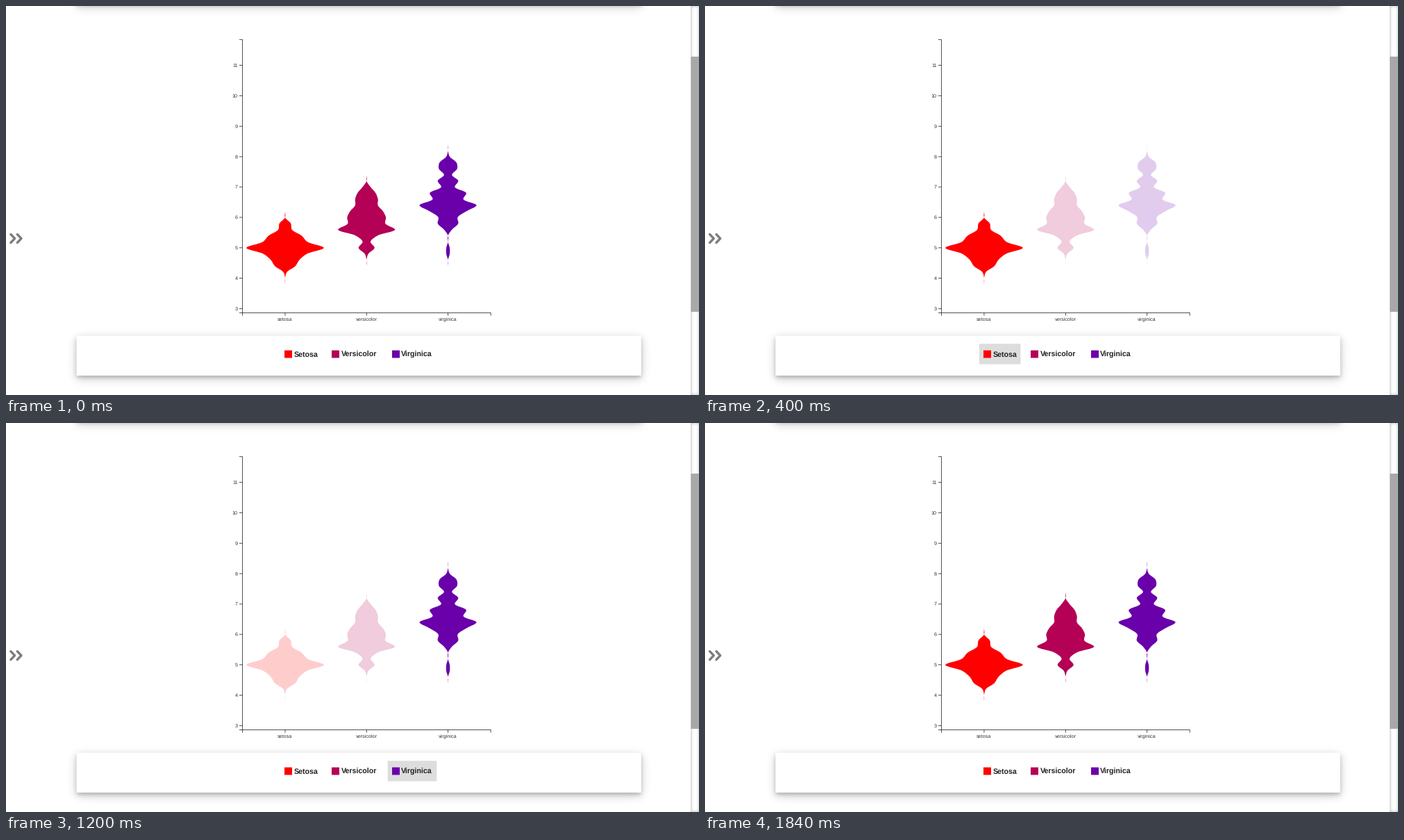
Recreate the animation shown at these times as a matplotlib script. Size 998 px wide and 561 px high, loop 2 s.

```python
import math

import matplotlib.pyplot as plt
import numpy as np
from matplotlib.animation import FuncAnimation
from matplotlib.patches import PathPatch, Rectangle
from matplotlib.path import Path

W, H, DPI = 998, 561, 100
ZOOM = 0.727                      # page zoom applied to all CSS lengths
LEFT, RIGHT = 340.36, 698.1
TOP, BOTTOM = 48.3, 442.36
LOW, HIGH = 4.3 / 1.5, 7.9 * 1.5  # range of the value axis
INK = "#333333"

plt.rcParams["path.snap"] = False
plt.rcParams["text.hinting"] = "none"

# Iris sepal lengths: first value, then how often each 0.1 step occurs
GROUPS = [
    ("setosa", "#ff0000", 4.3, "1314254883152021"),
    ("versicolor", "#b40055", 4.9, "1211015553244232123111"),
    ("virginica", "#6900aa", 4.9, "1000000113122265405230131101401"),
]
# Legend: swatch x, text x, highlight x range
LEGEND = [(401, 414.6, 395, 454.4), (469, 482.8, 463, 541.4),
          (556, 569.4, 549.7, 620.2)]
ACTIVE = [None, 0, 1, 2, None]


def pt(px):
    return px * 72 / DPI


def y_of(value):
    return BOTTOM - (value - LOW) / (HIGH - LOW) * (BOTTOM - TOP)


erf = np.vectorize(math.erf)


def soft_span(n, a, b, sigma):
    """Blurred coverage of the interval a..b over n pixels."""
    p = np.arange(n) + 0.5
    s = sigma * math.sqrt(2)
    return (erf((p - a) / s) - erf((p - b) / s)) / 2


def soft_box(x0, y0, x1, y1, sigma):
    return np.outer(soft_span(H, y0, y1, sigma), soft_span(W, x0, x1, sigma))


def density(start, counts, ticks, width=0.2):
    """Epanechnikov kernel estimate, unnormalised."""
    n = np.array([int(c) for c in counts])
    x = start + 0.1 * np.arange(len(n))
    u = (ticks[:, None] - x) / width
    return (np.clip(1 - u * u, 0, None) * n).sum(axis=1)


def catmull(points):
    """Control points of a centripetal Catmull-Rom spline as cubic Beziers."""
    p = np.vstack([points[:1], points, points[-1:]])
    out = []
    for p0, p1, p2, p3 in zip(p, p[1:], p[2:], p[3:]):
        d01, d12, d23 = (np.hypot(*(b - a))
                         for a, b in ((p0, p1), (p1, p2), (p2, p3)))
        s01, s12, s23 = map(math.sqrt, (d01, d12, d23))
        c1, c2 = p1, p2
        if s01:
            k = 2 * d01 + 3 * s01 * s12 + d12
            c1 = (p1 * k - p0 * d12 + p2 * d01) / (3 * s01 * (s01 + s12))
        if s23:
            k = 2 * d23 + 3 * s23 * s12 + d12
            c2 = (p2 * k + p1 * d23 - p3 * d12) / (3 * s23 * (s23 + s12))
        out += [c1, c2, p2]
    return out


def violin(center, half, ticks):
    ys = y_of(ticks)
    left = np.column_stack([center - half, ys])
    right = np.column_stack([center + half, ys])[::-1]
    a, b = catmull(left), catmull(right)
    verts = [left[0], *a, right[0], *b, left[0]]
    codes = ([Path.MOVETO] + [Path.CURVE4] * len(a) + [Path.LINETO]
             + [Path.CURVE4] * len(b) + [Path.CLOSEPOLY])
    return Path(verts, codes)


def line(xs, ys, width=ZOOM, color="#111111", **kw):
    ax.plot(xs, ys, color=color, lw=pt(width), **kw)


def rect(x0, y0, x1, y1, color, z):
    box = Rectangle((x0, y0), x1 - x0, y1 - y0, fc=color, lw=0, zorder=z)
    ax.add_patch(box)
    return box


def label(x, y, s, size, ha, color=INK, weight="normal"):
    ax.text(x, y, s, fontsize=pt(size), ha=ha, va="baseline", color=color,
            family="Liberation Sans", weight=weight, zorder=6)


fig = plt.figure(figsize=(W / DPI, H / DPI), dpi=DPI, facecolor="white")
ax = fig.add_axes([0, 0, 1, 1])
ax.axis("off")

# Card shadows and the inset shade of the scrollbar track
page = np.ones((H, W))
for y0, y1 in ((-80, -3), (475.5, 533)):
    for dy, blur, alpha in ((4, 8, 0.2), (6, 20, 0.19)):
        dy, sigma = dy * ZOOM, blur * ZOOM / 2
        page *= 1 - alpha * soft_box(101.5, y0 + dy, 914.8, y1 + dy, sigma)
inset = 1 - 0.3 * (1 - soft_box(986.5, 0, W, H, 2.2))
page[:, 986:] = inset[:, 986:]
ax.imshow(page, cmap="gray", vmin=0, vmax=1, extent=(0, W, H, 0),
          interpolation="nearest", aspect="auto", zorder=0)
ax.set_xlim(0, W)
ax.set_ylim(H, 0)

rect(101.5, 475.5, 914.8, 533, "white", 1)
rect(986.3, 73, W, 441, "#a8a8a8", 1)

# Double chevron of the side menu
for dx in (0, 9.4):
    line(np.array([6.9, 12.6, 6.9]) + dx, [329.3, 335.3, 341.3], 3.4, "#7d7d7d",
         solid_capstyle="round", solid_joinstyle="round")

# Axes
tick = 6 * ZOOM
font = 10 * ZOOM
line([LEFT - tick, LEFT, LEFT, LEFT - tick], [TOP, TOP, BOTTOM, BOTTOM],
     solid_joinstyle="miter", solid_capstyle="butt", zorder=5)
line([LEFT, LEFT, RIGHT, RIGHT],
     [BOTTOM + tick, BOTTOM, BOTTOM, BOTTOM + tick],
     solid_joinstyle="miter", solid_capstyle="butt", zorder=5)
for v in range(3, 12):
    y = y_of(v)
    line([LEFT - tick, LEFT], [y, y], solid_capstyle="butt", zorder=5)
    label(LEFT - 9 * ZOOM - 0.3, y + 0.32 * font, str(v), font, "right")

# Violins and legend
step = (RIGHT - LEFT) / 3.05
ticks = np.arange(15, 60) / 5
curves = [density(start, counts, ticks) for _, _, start, counts in GROUPS]
scale = 0.475 * step / max(c.max() for c in curves)
shapes, marks = [], []
for i, (name, color, _, _) in enumerate(GROUPS):
    cx = LEFT + step * (i + 0.525)
    shape = PathPatch(violin(cx, curves[i] * scale, ticks), fc=color, lw=0,
                      zorder=3)
    shapes.append(ax.add_patch(shape))
    line([cx, cx], [BOTTOM, BOTTOM + tick], solid_capstyle="butt", zorder=5)
    label(cx, BOTTOM + 15.6 * ZOOM, name, font, "center")

    sx, tx, h0, h1 = LEGEND[i]
    marks.append(rect(h0, 487.2, h1, 516.6, "#dddddd", 2))
    rect(sx, 496.6, sx + 11, 507.5, color, 4)
    label(tx, 506, name.capitalize(), 10.6, "left", "#222222", "bold")


def draw(i):
    on = ACTIVE[i]
    for k, (shape, mark) in enumerate(zip(shapes, marks)):
        shape.set_alpha(1 if on in (None, k) else 0.2)
        mark.set_visible(on == k)
    return shapes + marks


anim = FuncAnimation(fig, draw, frames=len(ACTIVE), interval=400, repeat=True,
                     repeat_delay=0, blit=False)
plt.show()
```
